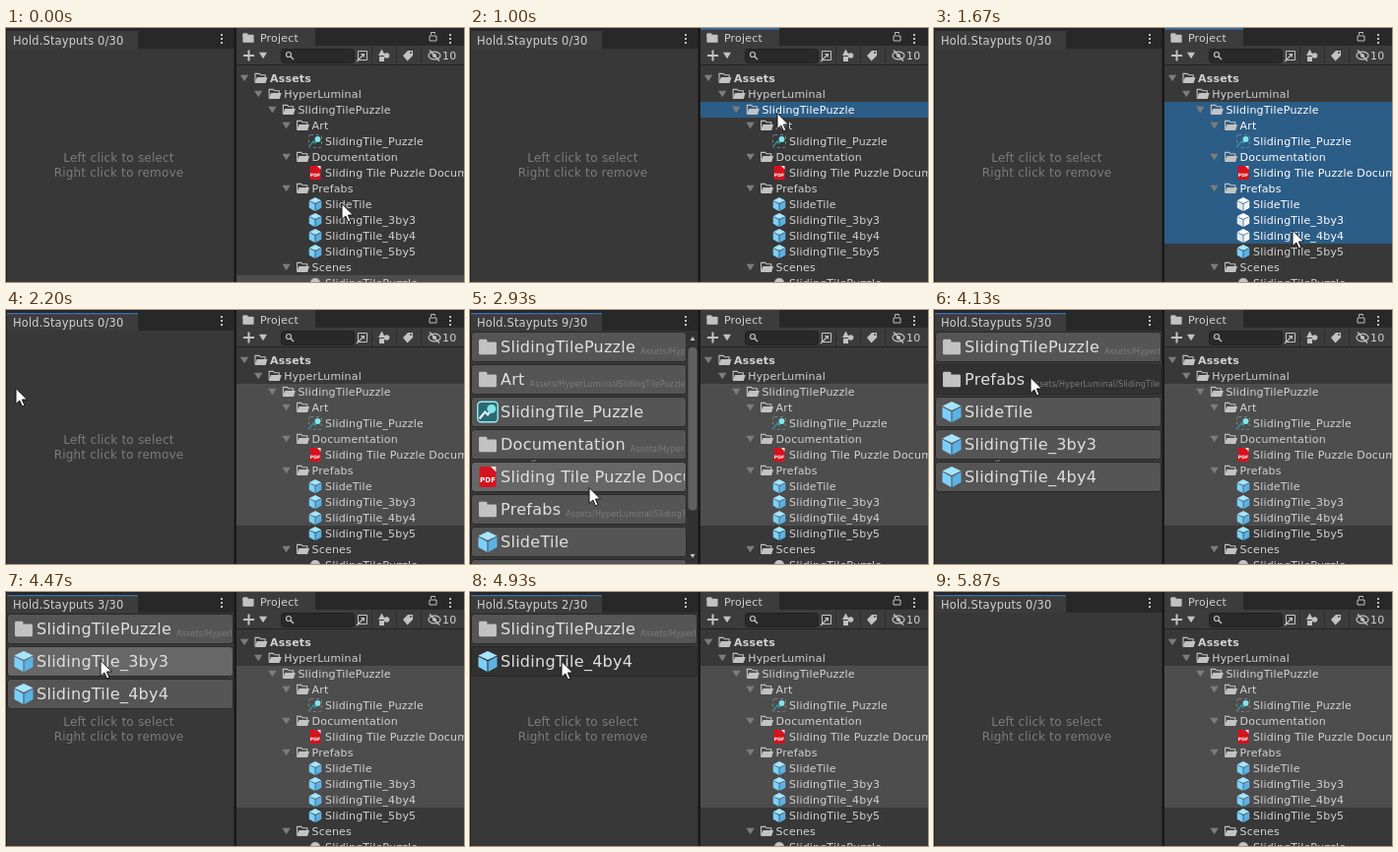
Recreate the animation shown at these times as an HTML page with a canvas. Size 465 px wide and 258 px high, loop 6.47 s.

```html
<!DOCTYPE html>
<html lang="en">
<head>
<meta charset="utf-8">
<title>Pinned assets panel</title>
<style>
html, body { margin: 0; width: 100%; height: 100%; overflow: hidden; background: #383838; }
canvas { display: block; width: 465px; height: 258px; }
</style>
</head>
<body>
<canvas id="stage"></canvas>
<script>
const W = 465, H = 258, LOOP = 6470, RATE = 15 / 1000;
const canvas = document.getElementById('stage');
const g = canvas.getContext('2d');
const ratio = window.devicePixelRatio || 1;
canvas.width = Math.round(W * ratio);
canvas.height = Math.round(H * ratio);

const GREY = '#c2c2c2', LIGHT = '#d2d2d2', FOCUS = '#3a72b0', BAR = '#3c3c3c';
const ROW_TOP = 22, ROW_PITCH = 33;

// Depth, icon and label of each row in the project tree
const tree = [
  [0, 'openFolder', 'Assets'],
  [1, 'openFolder', 'HyperLuminal'],
  [2, 'openFolder', 'SlidingTilePuzzle'],
  [3, 'openFolder', 'Art'],
  [4, 'picture', 'SlidingTile_Puzzle'],
  [3, 'openFolder', 'Documentation'],
  [4, 'pdf', 'Sliding Tile Puzzle Documentation'],
  [3, 'openFolder', 'Prefabs'],
  [4, 'cube', 'SlideTile'],
  [4, 'cube', 'SlidingTile_3by3'],
  [4, 'cube', 'SlidingTile_4by4'],
  [4, 'cube', 'SlidingTile_5by5'],
  [3, 'openFolder', 'Scenes'],
  [4, 'scene', 'SlidingTilePuzzle']
];
const FIRST = 2, LAST = 10, SCENE = 13;

const FOCUS_TREE = 930, RANGE = 1470, FOCUS_LIST = 2200, DROP = 2330, HOVER = 2930;
const FIRST_REMOVAL = 47, REMOVAL_EVERY = 4; // in ticks

// Pointer moves: start, end and where each one arrives
const pointerStart = { x: 341, y: 178 };
const moves = [
  [70, 670, 309, 80],
  [930, 1470, 364, 205],
  [1670, 2200, 10, 79],
  [2470, 2930, 121, 180],
  [3070, 3950, 98, 68],
  [4000, 5000, 93, 70],
  [5070, 5270, 88, 42],
  [5330, 5530, 61, 85],
  [5730, 5870, 192, 208]
];
const POINTER_GONE = 5870;

const timeOf = tick => Math.round(tick / RATE / 10) * 10;

function pointerAt(t) {
  let { x, y } = pointerStart;
  for (const [start, end, toX, toY] of moves) {
    const k = Math.min(Math.max((t - start) / (end - start), 0), 1);
    const ease = k * k * (3 - 2 * k);
    x += (toX - x) * ease;
    y += (toY - y) * ease;
  }
  return { x: Math.round(x), y: Math.round(y) };
}

const rowUnderPointer = t => Math.floor((pointerAt(t).y - ROW_TOP) / ROW_PITCH);

function box(x, y, w, h, fill, r = 0, stroke) {
  g.beginPath();
  g.roundRect(x, y, w, h, r);
  paint(fill, stroke, 1);
}

function poly(points, fill, stroke, width = 1, closed = true) {
  g.beginPath();
  for (let i = 0; i < points.length; i += 2) g.lineTo(points[i], points[i + 1]);
  if (closed) g.closePath();
  paint(fill, stroke, width);
}

function oval(x, y, rx, ry, fill, stroke, width = 1.2) {
  g.beginPath();
  g.ellipse(x, y, rx, ry, 0, 0, 2 * Math.PI);
  paint(fill, stroke, width);
}

function paint(fill, stroke, width) {
  if (fill) { g.fillStyle = fill; g.fill(); }
  if (stroke) { g.strokeStyle = stroke; g.lineWidth = width; g.stroke(); }
}

function triangleDown(x, y, size, color) {
  poly([x - size, y - size * 0.8, x + size, y - size * 0.8, x, y + size * 0.8], color);
}

function text(str, x, y, size, color, weight = '', align = 'left') {
  g.font = `${weight} ${size}px "DejaVu Sans", sans-serif`;
  g.letterSpacing = size / 60 + 'px';
  g.textAlign = align;
  g.fillStyle = color;
  g.fillText(str, x, y);
}

// Icons are drawn about their centre in a 16 unit square
const icons = {
  folder() {
    box(-7, -6, 6.5, 5, GREY, 1);
    box(-7, -4, 14, 10, GREY, 1);
  },
  openFolder() {
    poly([-6, 4, -6, -5, -1.5, -5, 0, -3.5, 5, -3.5, 5, -1], null, GREY, 1.2, false);
    poly([-6.5, 5.5, -4, -1, 7.5, -1, 5.5, 5.5], GREY);
  },
  cube(lit) {
    const [top, left, right] = lit ? ['#fff', '#e4e9ee', '#f4f6f8'] : ['#a6e4ff', '#7bd0fb', '#5ab3e4'];
    poly([0, -7.5, 6.8, -4.2, 0, -1, -6.8, -4.2], top);
    for (const [side, fill] of [[-1, left], [1, right]])
      poly([6.8 * side, -3.5, 0.4 * side, -0.2, 0.4 * side, 7.5, 6.8 * side, 4], fill);
  },
  picture() {
    g.setLineDash([3, 3]);
    box(-7, -7, 14, 14, null, 2, '#7d9094');
    g.setLineDash([]);
    pictureMark('#2f98a5');
  },
  bigPicture() {
    box(-7.3, -7.3, 14.6, 14.6, '#2b6973', 2.5, '#9debf0');
    pictureMark('#e2f8f8');
  },
  pdf() {
    box(-6, -7.5, 12, 15, '#d5121e', 1);
    poly([2, -7.5, 6, -7.5, 6, -3.5], '#f2e4e4');
    text('PDF', 0, 4, 5, '#fff', 'bold', 'center');
  },
  scene() { oval(0, 0, 5.5, 5.5, GREY); }
};

function pictureMark(line) {
  poly([-6, 5, -2, 0, 0, 2, 3, -2], null, line, 1.5, false);
  oval(2.7, -2.2, 3.2, 3.2, '#83e3ea');
}

function icon(name, x, y, scale, lit) {
  g.save();
  g.translate(x, y);
  g.scale(scale, scale);
  icons[name](lit);
  g.restore();
}

function kebab(x) {
  for (const y of [7, 11, 15]) box(x - 1, y - 1, 2, 2, GREY);
}

const treeFocused = t => t >= FOCUS_TREE && t < FOCUS_LIST;

function drawTree(t) {
  const last = t >= RANGE ? LAST : FIRST;
  box(234, 38, 231, 220, '#383838');
  tree.forEach(([depth, kind, label], i) => {
    const y = 51 + 16 * i;
    const selected = t < FOCUS_TREE ? i === SCENE : i >= FIRST && i <= last;
    const lit = selected && treeFocused(t);
    if (selected) box(234, y - 8, 231, 16, lit ? '#2c5d87' : '#4d4d4d');
    const x = 242 + 14.2 * depth;
    const leaf = depth === 4;
    if (!leaf) triangleDown(x, y, 4.2, '#7c7c7c');
    icon(kind, leaf ? 314 : x + 16.5, y, 0.92, lit);
    text(label, leaf ? 324 : x + 26, y + 4, 11, lit ? '#fff' : LIGHT, i ? '' : 'bold');
  });
}

function drawToolbar() {
  box(234, 18, 231, 20, BAR);
  box(234, 37, 231, 1, '#232323');
  box(241, 27, 11, 2, GREY);
  box(245.5, 22.5, 2, 11, GREY);
  triangleDown(261, 28, 4, GREY);

  box(279.5, 21.5, 74, 14, '#292929', 3, '#202020');
  oval(287, 27, 2.5, 2.5, null, GREY);
  poly([289, 29, 292, 32], null, GREY, 1.4);
  for (const x of [371, 396, 421]) box(x, 19, 1, 18, '#2c2c2c');

  box(357.5, 23.5, 9, 9, null, 0, GREY);
  poly([356, 34, 363, 27], null, GREY, 1.2);
  poly([360, 26, 364, 26, 364, 30], GREY);

  poly([378, 28, 381.5, 21.5, 385, 28], GREY);
  oval(386.5, 28, 2.8, 2.8, GREY);
  box(379, 29, 5, 5, GREY);

  poly([403, 28, 408, 23, 413, 23, 413, 28, 407.5, 33.5], GREY);
  oval(411, 25, 1, 1, BAR);

  oval(435, 28, 6, 3.8, null, GREY);
  oval(435, 28, 2, 2, GREY);
  poly([430, 22.5, 440, 33.5], null, GREY, 1.4);
  text('10', 443, 32, 11, LIGHT);
}

function drawProject(t) {
  drawTree(t);
  box(234, 0, 231, 19, '#282828');
  box(234, 0, 80, 19, BAR);
  if (treeFocused(t)) box(234, 0, 80, 1.5, FOCUS);
  icon('folder', 246, 10, 0.8);
  text('Project', 258, 14, 11, LIGHT);
  box(430, 8, 7, 5, null, 0, GREY);
  poly([431.5, 7, 431.5, 4.5, 435.5, 4.5, 435.5, 6], null, GREY, 1, false);
  kebab(451);
  drawToolbar();
}

function listAt(tick) {
  if (timeOf(tick) < DROP) return { items: [], pressed: -1 };
  const items = tree.slice(FIRST, LAST + 1);
  let pressed = -1;
  for (let at = FIRST_REMOVAL; items.length && at <= tick + 1; at += REMOVAL_EVERY) {
    const row = rowUnderPointer(timeOf(at));
    if (at > tick) pressed = row;
    else items.splice(row, 1);
  }
  return { items, pressed };
}

function drawEntry([, kind, label], y, width, fill) {
  const folder = kind === 'openFolder';
  box(1.5, y + 0.5, width - 1, 30, fill, 3, '#2a2a2a');
  g.save();
  g.beginPath();
  g.rect(1, y, width - 2, 31);
  g.clip();
  if (folder) icon('folder', 18, y + 15.5, 1.28);
  else icon(kind === 'picture' ? 'bigPicture' : kind, 18, y + 15.5, 1.4);
  text(label, 31, y + 21, 16, '#e0e0e0');
  if (folder) {
    const start = 36 + g.measureText(label).width;
    const root = 'Assets/HyperLuminal/SlidingTilePuzzle';
    text(root.endsWith(label) ? root : `${root}/${label}`, start, y + 23, 8, '#7c7c7c');
  }
  g.restore();
}

function drawScrollbar(count) {
  box(220, 21, 12, 237, '#323232');
  triangleDown(226, 250, 2.5, GREY);
  triangleDown(226, 29, -2.5, GREY);
  box(221.5, 38, 9, 1490 / count, '#606060', 4);
}

function drawList(tick, t) {
  const { items, pressed } = listAt(tick);
  const scrolls = items.length > 7;
  box(0, 0, 234, H, '#383838');
  text('Left click to select', 114.5, 136, 12, '#7c7c7c', '', 'center');
  text('Right click to remove', 114.5, 151, 12, '#7c7c7c', '', 'center');

  const hovered = t >= HOVER && t < POINTER_GONE ? rowUnderPointer(t) : -1;
  items.forEach((item, i) => {
    const fill = i === pressed ? '#313131' : i === hovered ? '#676767' : '#555';
    drawEntry(item, ROW_TOP + ROW_PITCH * i, scrolls ? 219 : 230, fill);
  });
  if (scrolls) drawScrollbar(items.length);

  box(0, 0, 232, 21, '#282828');
  box(1, 3, 133, 18, BAR);
  if (t >= FOCUS_LIST) box(1, 3, 133, 1.2, FOCUS);
  text(`Hold.Stayputs ${items.length}/30`, 7, 17, 11.4, LIGHT);
  kebab(219);
  box(0, 0, 1, H, '#202020');
  box(231.5, 0, 2.5, H, '#191919');
}

function drawPointer(t) {
  if (t >= POINTER_GONE) return;
  const { x, y } = pointerAt(t);
  g.save();
  g.translate(x, y);
  poly([0, 0.5, 0, 16.5, 3.8, 13, 6.5, 19, 9, 18, 6.4, 12, 11.5, 12], '#fff', '#111');
  g.restore();
}

function draw() {
  // The screen refreshes 15 times a second
  const tick = Math.floor((performance.now() % LOOP + 5) * RATE);
  const t = timeOf(tick);
  g.setTransform(ratio, 0, 0, ratio, 0, 0);
  drawProject(t);
  drawList(tick, t);
  drawPointer(t);
  requestAnimationFrame(draw);
}
draw();
</script>
</body>
</html>
```
